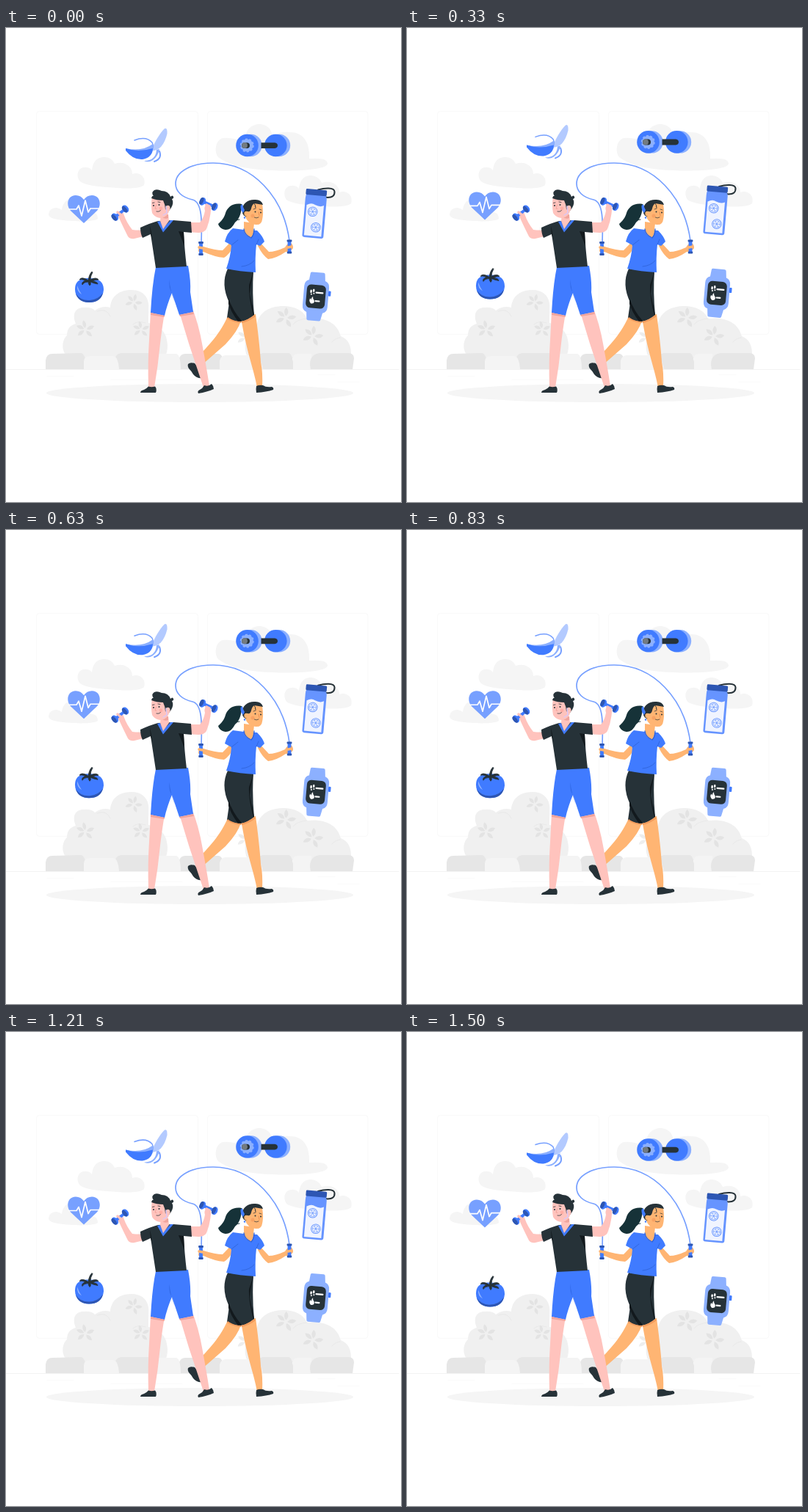
Write an HTML page that moves like this. It is 538 px wide and 646 px high and loops after 1.54 s.

```html
<!DOCTYPE html>
<html lang="en">
<head>
<meta charset="utf-8">
<title>Fitness</title>
<style>
html, body { margin: 0; height: 100%; overflow: hidden; background: #fff; }
svg { display: block; width: 538px; height: 646px; }
path { stroke-linecap: round; stroke-linejoin: round; }
.blue { fill: #407bff; } .sky { fill: #8cb0ff; } .pale { fill: #b3caff; } .navy { fill: #2d56b3; }
.ink { fill: #263238; } .black { fill: #12191d; } .white { fill: #fff; }
.pink { fill: #ffc3bd; } .tan { fill: #ffb573; }
.cloud { fill: #f5f5f5; } .bush { fill: #f0f0f0; } .stone { fill: #e6e6e6; } .stone2 { fill: #f4f4f4; } .leaf { fill: #e3e3e3; }
.line { fill: none; }
</style>
</head>
<body>
<svg viewBox="0 0 538 646">
<defs>
  <path id="leaf" d="M0-2Q-5-7-1-13Q5-8 0-2Z"/>
  <g id="sprig">
    <use href="#leaf" transform="rotate(-62)"/><use href="#leaf" transform="rotate(-8)"/>
    <use href="#leaf" transform="rotate(72)"/><use href="#leaf" transform="rotate(140)"/>
    <use href="#leaf" transform="rotate(-125)"/>
  </g>
  <g id="weight">
    <path d="M-9 0H9" class="line" stroke="#407bff" stroke-width="4"/>
    <g class="blue"><ellipse cx="-9" rx="4" ry="5.600"/><ellipse cx="9" rx="4" ry="5.600"/></g>
    <g class="navy"><ellipse cx="-10.500" rx="2.600" ry="5"/><ellipse cx="7.800" rx="2.600" ry="5"/></g>
  </g>
  <g id="handle">
    <rect x="-2.400" y="-9" width="4.800" height="18" class="blue"/>
    <rect x="-3.400" y="-9.500" width="6.800" height="3" rx="1" class="navy"/>
    <rect x="-3.200" y="6.500" width="6.400" height="3" rx="1" class="navy"/>
  </g>
  <g id="slice" class="line" stroke="#407bff" stroke-opacity=".75">
    <circle r="6.300"/><circle r="4.600" stroke-width=".6"/>
    <path d="M-4.600 0H4.600M-2.300-4L2.300 4M2.300-4L-2.300 4" stroke-width=".7"/>
  </g>
</defs>

<!-- room -->
<g class="line" stroke="#f9f9f9">
  <rect x="41.500" y="113.500" width="220" height="304" rx="4"/>
  <rect x="274.500" y="113.500" width="218.500" height="304" rx="4"/>
</g>
<g class="cloud">
  <path d="M101 209C95 203 97 191 106 190Q113 189 117 194C119 179 126 176 134 176Q144 176 148 185Q158 182 164 186Q172 190 172 199Q180 196 186 202Q190 207 188 214C181 220 160 219 138 217Q108 215 101 209Z"/>
  <path d="M58 254Q59 245 69 245Q74 246 76 248C78 235 85 233 92 233Q102 235 104 245Q112 242 116 251Q125 251 125 260C120 265 83 264 66 260Q58 258 58 254Z"/>
  <path d="M289 176C283 169 285 153 295 150Q309 148 326 157C324 138 335 131 346 131Q360 132 363 147Q374 141 386 142C405 142 414 155 413 178Q438 176 438 185C435 195 380 196 345 193Q307 190 289 176Z"/>
  <path d="M382 234C377 227 379 216 388 215Q395 214 399 219C401 204 408 201 416 201Q426 202 430 211Q440 208 447 212Q454 217 454 224Q462 221 468 227Q472 232 470 239C463 245 440 244 420 242Q390 240 382 234Z"/>
</g>
<g class="bush">
  <path d="M83 447C75 440 76 425 83 419Q83 406 95 403C89 388 96 381 106 381Q116 380 121 385Q131 378 142 381C143 364 156 357 171 357C189 357 196 370 194 384V402C211 405 220 417 220 433Q220 442 216 450H92Z"/>
  <path d="M330 450C322 436 326 420 335 414Q334 404 342 403C345 386 361 378 381 379Q403 381 410 396C433 393 451 401 456 420Q471 426 470 447L466 451Z"/>
</g>
<path d="M124 386Q137 381 142 393M190 402Q179 398 173 404M410 396Q396 397 391 404M455 422Q448 423 444 428" class="line" stroke="#e9e9e9"/>
<g class="leaf">
  <use href="#sprig" transform="translate(108 411)"/>
  <use href="#sprig" transform="translate(174 374) rotate(25) scale(.9)"/>
  <use href="#sprig" transform="translate(184 411) scale(.9)"/>
  <use href="#sprig" transform="translate(381 395) rotate(15) scale(1.1)"/>
  <use href="#sprig" transform="translate(418 420) rotate(18) scale(1.1)"/>
  <use href="#sprig" transform="translate(327 422) rotate(10)" opacity=".6"/>
</g>
<path d="M54 465.500V453Q55 444 63 444L102 443Q109 444 110 465.500ZM149 465.500V449Q151 443 158 443H195Q203 444 204 465.500ZM236 465.500V450Q238 444 244 444H290Q297 446 298 465.500ZM342 465.500V447Q346 443 352 443H385Q391 444 392 465.500Z" class="stone"/>
<path d="M106 465.500V454Q107 447 114 447H146Q153 448 154 465.500ZM198 465.500V450Q200 444 207 444H232Q238 446 238 465.500ZM291 465.500V453Q293 446 300 446H339Q346 446 350 465.500ZM391 465.500V448Q393 444 399 444H416V465.500Z" class="stone2"/>
<path d="M415 465.500Q412 453 418 447Q422 443 430 443H467Q474 444 474 450L472 465.500Z" class="stone"/>
<path d="M0 465.500H535" class="line" stroke="#f3f3f3"/>
<path d="M56 474.500H92M143 479.500H240M425 472.500H448M452 482.500H481" class="line" stroke="#fafafa"/>
<ellipse cx="264" cy="497.500" rx="209" ry="12.500" class="cloud"/>

<!-- skipping rope -->
<path d="M266 292C267 262 267 237 254 234C240 231 231 223 231 212C231 196 252 184 282 184C336 184 378 230 386 290" class="line" stroke="#77a0ff" stroke-width="1.700"/>

<!-- woman -->
<path d="M301 395L320 399Q316 413 299 431L267 459L259 451C273 435 289 421 301 395Z" class="tan"/>
<path d="M248 458Q251 455 257 457L265 467Q268 473 266 477Q260 478 255 472Q252 467 249 464Q247 461 248 458Z" class="ink"/>
<path d="M320 394L340 390C343 412 346 438 347 455Q350 470 349 490H342C338 466 327 440 320 394Z" class="tan"/>
<path d="M341 488Q345 486 350 487Q354 490 362 489Q365 490 364 493Q355 496 341 497Q340 492 341 488Z" class="ink"/>
<path d="M302 328L337 331Q335 361 338 391Q330 398 320 400Q310 400 301 395L304 374Q292 349 302 328Z" class="ink"/>
<path d="M337 332Q333 350 332 362Q335 378 338 391L337 392Q330 366 331 350ZM303 368Q309 386 321 399L316 400Q306 386 303 376Z" class="black"/>
<path d="M302 394Q310 400 320 400V402Q308 401 301 396ZM320 400Q330 398 338 391L340 393Q331 400 321 402Z" fill="#f29c5d"/>
<path d="M309 288Q301 297 295 303Q285 303 269 298Q264 294 263 297L262 304Q264 308 269 305Q284 312 297 313Q303 310 313 294Z" class="tan"/>
<path d="M344 290L358 305Q367 305 380 299Q383 293 388 293Q391 295 391 300Q388 305 381 305Q368 314 357 315Q349 309 343 297Z" class="tan"/>
<use href="#handle" x="265.500" y="300.500"/>
<use href="#handle" x="386" y="298"/>
<path d="M263 299L268 300M384 299L389 298" class="line" stroke="#ffb573" stroke-width="3.500"/>
<path d="M309 273L324 275L342 276Q350 284 352 291L346 297L341 295Q339 313 340 333Q318 332 300 328Q306 311 307 296L298 291Q301 279 309 273Z" class="blue"/>
<path d="M307 296L316 289M341 295L344 288M338 317Q332 324 321 325" class="line" stroke="#2f62d6" stroke-width=".8"/>
<path d="M324 264L338 266L337 275Q337 283 333 286Q324 281 324 275Z" class="tan"/>
<path d="M324 274Q325 282 334 286Q338 282 338 274" class="line" stroke="#2d62da" stroke-width="1.300"/>
<path d="M321 240C309 238 302 244 299 252C297 260 292 264 289 267C290 270 292 274 299 275C306 275 309 270 312 265C318 260 321 252 321 240Z" fill="#163238"/>
<path d="M299 274Q307 273 310 266Q313 261 318 261" class="line" stroke="#163238"/>
<path d="M325 244Q327 236 338 235L349 240Q351 252 349 261Q348 269 340 268Q329 267 326 257Z" class="tan"/>
<path d="M322 252C320 240 329 233 340 234Q348 234 350 241L338 239Q335 241 334 246Q333 251 329 250L327 257Q323 256 322 252Z" class="ink"/>
<circle cx="327.500" cy="253" r="3.200" class="tan"/>
<path d="M319.500 242Q319 249 323 252L325 248Q323 245 322 240Z" class="blue"/>
<path d="M338 239Q340 241 340 245" class="line" stroke="#263238"/>
<circle cx="339.500" cy="250.500" r="1" class="ink"/><circle cx="347" cy="251.500" r="1" class="ink"/>
<path d="M337 247L340 246M345 247L348 248M338 258Q341 260 344 258" class="line" stroke="#263238" stroke-width=".7"/>
<path d="M344 251L345 256" class="line" stroke="#e58b4e" stroke-width=".8"/>
<circle cx="336" cy="256" r="2.500" fill="#f7a263"/>
<circle cx="325" cy="258.500" r="1.200" class="blue"/>

<!-- man -->
<path d="M197 386L216 388Q212 412 210 430Q207 461 202 490H194Q193 454 195 425Z" class="pink"/>
<path d="M236 387L255 385Q263 407 267 430Q273 462 277 488L269 490Q258 457 249 430Z" class="pink"/>
<path d="M194 488.500Q198 490 203 488.500Q206 492 204 497H183Q183 494 188 493Q192 491 194 488.500Z" class="ink"/>
<path d="M270 487Q276 489 280 485Q283 488 283 492Q274 496 262 498Q260 495 264 493Q268 491 270 487Z" class="ink"/>
<path d="M204 326L248 324Q252 345 251 360L255 387L236 391L226 361Q219 378 216 392L197 388Q199 350 204 326Z" class="blue"/>
<path d="M226 361Q221 354 223 343Q222 353 230 374Z" fill="#2f66e2"/>
<path d="M197 388L216 392L215.500 394L197 391ZM236 391L255 387L256 390L237 393Z" fill="#f0a49c"/>
<path d="M190 275Q181 276 172 275Q164 265 160 253Q157 247 152 251Q149 254 154 259Q159 270 166 284Q169 288 175 287L191 283Z" class="pink"/>
<path d="M248 265L264 265Q269 260 271 249Q269 243 274 240Q280 241 279 248Q278 262 273 274Q270 279 262 279L248 278Z" class="pink"/>
<path d="M207 263L228 262L252 264L253 279L242 278Q243 300 246 325L204 327L197 281L186 286Q183 280 183 272Q196 266 207 263Z" class="ink"/>
<path d="M235 277L242 278L243 297Q239 287 235 277ZM197 281L196 270Q198 276 199 288Z" class="black"/>
<path d="M206 264L214 278.500L228 262L224 262L214 273L210 263Z" class="blue"/>
<path d="M210 263L211 252L221 254L222 263L214 274Z" class="pink"/>
<path d="M211 257Q216 261 221 259L221 254Z" fill="#f0a49c"/>
<path d="M199 230Q211 224 222 231L223 246Q221 257 212 259Q203 259 199 252Q197 241 199 230Z" class="pink"/>
<path d="M198 232Q199 228 201 229Q197 224 202 221Q206 219 212 222Q221 222 224 230Q227 227 228 230Q229 232 226 233Q229 238 225 245L222 249L217 247Q217 241 214 235Q205 235 198 232Z" class="ink"/>
<ellipse cx="220.500" cy="245.500" rx="3" ry="3.800" class="pink"/>
<path d="M218 243L219 252L214 255" class="line" stroke="#d9c7fa" stroke-width="1.400"/>
<circle cx="201" cy="242" r="1" class="ink"/><circle cx="208.500" cy="241" r="1" class="ink"/>
<path d="M199.500 238.500L202 238M207 237L210 237.500M205 250Q209 251 211 248" class="line" stroke="#263238" stroke-width=".8"/>
<path d="M204.500 241L203 246L205 246.500" class="line" stroke="#ee9d94" stroke-width=".8"/>
<circle cx="211" cy="246" r="2.400" fill="#ffaea5"/>
<use href="#weight" transform="translate(155.500 252) rotate(-38)"/>
<use href="#weight" transform="translate(276 240) rotate(24)"/>
<path d="M152 251L157 255M273 241L277 243" class="line" stroke="#ffc3bd" stroke-width="3.500"/>

<!-- floating items -->
<g id="items">
  <path d="M198 167C202 156 209 144 216 137Q220 135 219.500 144Q217 155 211 162Q205 168 198 167Z" class="pale"/>
  <path d="M188 181Q204 181 205 166L209 165Q207 175 200 180Q194 184 188 181Z" class="sky"/>
  <path d="M175 153Q191 147 199 156Q202 162 198 167" class="line" stroke="#77a0ff" stroke-width="1.500"/>
  <path d="M163 164Q185 169 200 158Q202 167 197 173Q180 181 163 164Z" class="sky"/>
  <path d="M163 164Q180 170 200 164Q199 177 186 179Q173 180 163 167Z" class="blue"/>
  <path d="M209 168Q213 178 202 182" class="line" stroke="#77a0ff" stroke-width="2"/>

  <path d="M106 266L88 249C81 241 84 228 95 228Q102 228 106 234Q110 228 117 228C128 228 131 241 124 249Z" fill="#77a0ff"/>
  <path d="M86 247H96L99 242L103 256L108 235L112 251L115 246H127" class="line" stroke="#fff" stroke-width="1.700"/>

  <circle cx="333.500" cy="160" r="15.200" class="sky"/><circle cx="328.500" cy="160" r="15.300" class="blue"/>
  <circle cx="328.300" cy="160" r="8.500" class="sky"/>
  <circle cx="328.300" cy="160" r="8.500" class="line" stroke="#8cb0ff" stroke-width="2" stroke-dasharray="3 2.340"/>
  <rect x="321" y="156.200" width="11" height="7.800" rx="3.900" class="ink"/><circle cx="325" cy="160" r="3.900" fill="#737b80"/>
  <circle cx="372" cy="160" r="15.200" class="sky"/><circle cx="367.300" cy="160" r="15.300" class="blue"/>
  <path d="M347.500 156.200H366Q370 157 370 160Q370 163.500 366 164H347.500Z" class="ink"/>

  <path d="M425 220.500C434 218 447 217 447.500 223Q448 231 438 231Q434 231 434 227" class="line" stroke="#263238" stroke-width="2"/>
  <g transform="translate(420 253) rotate(5)">
    <path d="M-13-26H13Q15-24 15-20V30Q15 33 12 33H-11Q-14 33-14 30V-20Q-14-24-13-26Z" fill="#6694ff"/>
    <path d="M-11.500-11Q-5-15 0-12Q7-9 12-12V30.500H-11.500Z" fill="#f0f4ff"/>
    <rect x="-14" y="-33" width="28.500" height="8" rx="1.500" class="navy"/>
    <use href="#slice" x="-2.500" y="-2.500"/><use href="#slice" x="3.500" y="18.500"/>
  </g>

  <g transform="translate(422 366) rotate(5)">
    <path d="M-8-33H8Q10-33 10-31L11-22Q17-20 17-13V13Q17 20 11 22L9 31Q9 33 7 33H-8Q-10 33-10 31L-11 22Q-17 20-17 13V-13Q-17-20-11-22L-10-31Q-10-33-8-33Z" class="sky"/>
    <rect x="16.500" y="-9" width="3.500" height="7" rx="1" class="blue"/>
    <rect x="-13" y="-16" width="26" height="32" rx="6" class="ink"/>
    <g class="white">
      <ellipse cx="-7" cy="-6.500" rx="1.300" ry="2.300"/><ellipse cx="-3.500" cy="-8" rx="1.300" ry="2.300"/>
      <circle cx="-6.400" cy="-2.800" r="1"/><circle cx="-3" cy="-4" r="1"/>
      <path d="M-6 10Q-10 6-7 3L-6 5Q-6 2-4 0Q-4 3-2 5Q0 10-6 10Z"/>
      <rect x="-1" y="-6.500" width="11" height="2.200" rx="1"/><rect x="-1" y="5" width="7" height="2.200" rx="1"/>
    </g>
  </g>

  <path d="M94 356C94 343 104 341 113 341C124 341 133 344 133 357C132 368 124 374 113 374C102 374 94 367 94 356Z" class="blue"/>
  <path d="M95 362Q102 372 114 371Q126 370 132 361Q129 374 113 374Q99 374 95 362Z" class="navy"/>
  <path d="M97 351Q96 359 103 363Q99 357 97 351Z" class="sky"/>
  <path d="M112 344Q113 336 117 332L118 333Q115 338 115 343Q123 339 126 343Q121 343 118 345Q125 346 125 349Q119 348 115 346Q116 350 114 351Q112 349 112 346Q106 346 104 350Q102 347 108 344Q103 342 100 343Q103 338 112 344Z" class="ink" stroke="#263238" stroke-width=".8"/>
</g>
</svg>
<script>
const LOOP = 1540, PHASE = 40, RISE = 10.7, REST = 0.55;
const items = document.getElementById('items');

// Constant speed up, then constant speed down.
function draw(now) {
  const p = ((now + PHASE) % LOOP) / LOOP;
  const lift = RISE * (1 - Math.abs(2 * p - 1));
  items.setAttribute('transform', `translate(0 ${(REST - lift).toFixed(2)})`);
}

let start;
function tick(now) {
  start ??= now;
  draw(now - start);
  requestAnimationFrame(tick);
}
draw(0);
requestAnimationFrame(tick);
</script>
</body>
</html>
```
